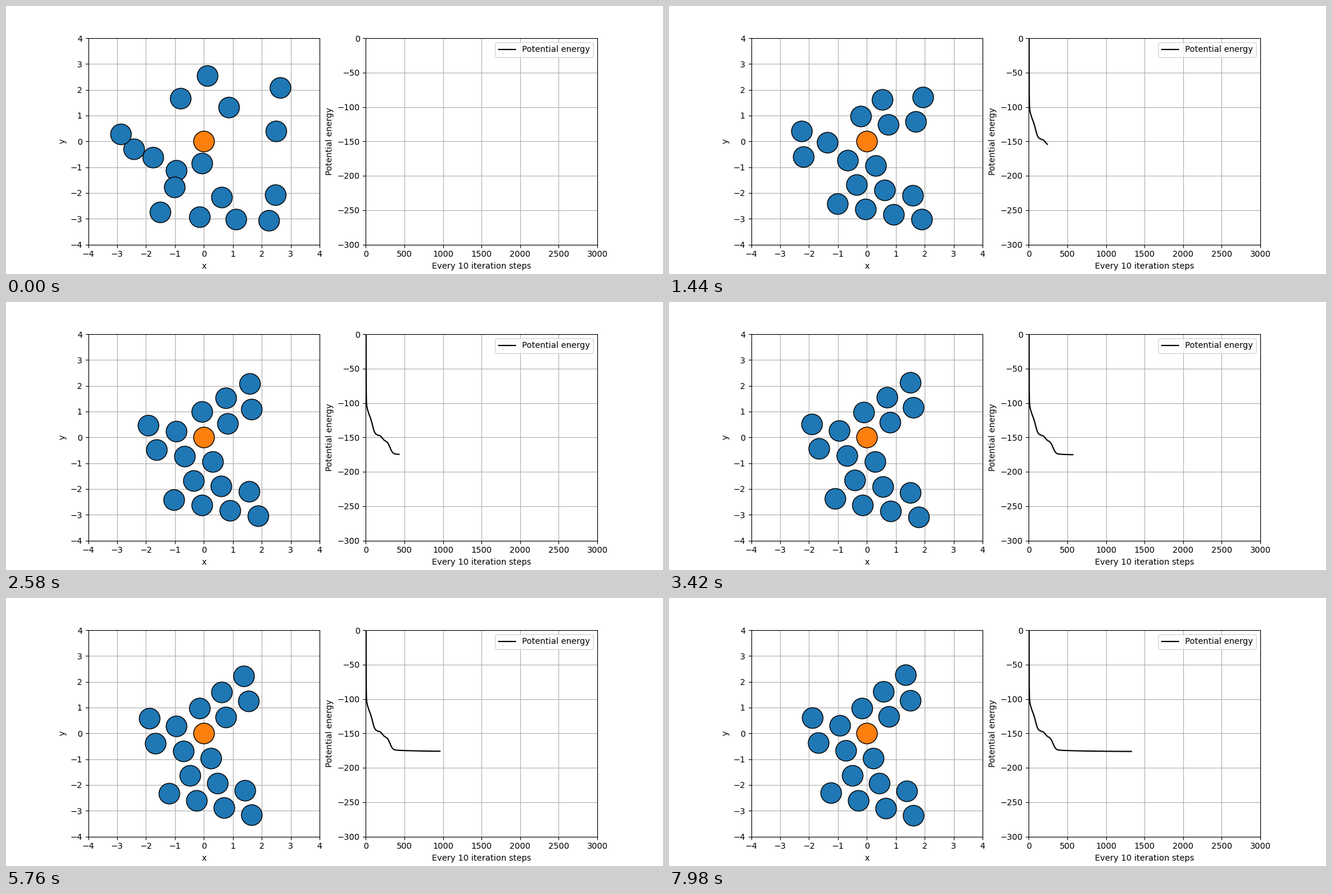
A matplotlib script that plays this animation: 1100 by 450 pixels, repeating every 8000 ms.

```python
import numpy as np
import matplotlib.pyplot as plt
from matplotlib.animation import FuncAnimation

STEPS = 134                 # simulation snapshots, 60 ms each
FRAMES, INTERVAL = 200, 40
SPACING = 0.99              # equilibrium distance
CONTACT = 0.95              # closest distance after the first snapshot
FORMED, FOLDING, DOCKED = 12, 24, 43
HEX = np.exp(1j * np.pi / 3)

# Each arm is a piece of triangular lattice that turns about the fixed ball:
# lattice sites, start positions, angles when formed, folding, docked and
# settled, and the distance still to go when formed and folding.
ARMS = [
    ([HEX, 1 + HEX, 1],
     [-0.81 + 1.67j, 0.12 + 2.54j, 0.86 + 1.32j],
     (52, 41.8, 33.4, 40.4), (0, 0)),
    ([2, 2 + HEX],
     [2.49 + 0.40j, 2.64 + 2.08j],
     (16.8, 15.7, 33.4, 40.4), (0.19 + 0.21j, -0.22 + 0.23j)),
    ([-1 - HEX, -1, -2],
     [-2.42 - 0.30j, -1.76 - 0.62j, -2.87 + 0.28j],
     (-40.4, -26.3, -13.7, -17.9), (-0.89 - 0.91j, -0.49 - 0.49j)),
    ([first + i - row * HEX
      for row, first in ((1, 0), (2, 1), (3, 1)) for i in range(row + 1)],
     [-0.95 - 1.13j, -0.06 - 0.85j,
      -1.02 - 1.77j, 0.62 - 2.16j, 2.47 - 2.07j,
      -1.51 - 2.74j, -0.15 - 2.93j, 1.11 - 3.02j, 2.25 - 3.07j],
     (-12.4, -11.9, -12.3, -17.3), (0, 0)),
]


def separate(z):
    """Push overlapping particles apart; the first one stays fixed."""
    for _ in range(40):
        gap = z[:, None] - z
        dist = np.abs(gap) + np.eye(len(z))
        z = z + (np.clip(CONTACT - dist, 0, None) / 2 * gap / dist).sum(axis=1)
        z[0] = 0
    return z


def build_tracks():
    k = np.arange(STEPS)
    keys = [FORMED, FOLDING, DOCKED]
    pull = 1 - (1 - np.minimum(k / FORMED, 1)) ** 1.6
    settle = 1 - np.exp(-np.maximum(k - DOCKED, 0) / 40)
    settle /= settle[-1]

    parts = [np.zeros((STEPS, 1), complex)]
    for sites, start, (*angles, final), gaps in ARMS:
        angle = np.interp(k, keys, angles) + (final - angles[-1]) * settle
        gap = np.interp(k, keys, np.array([*gaps, 0], complex))
        turn = SPACING * np.exp(1j * np.radians(angle))
        pose = gap[:, None] + turn[:, None] * np.array(sites)
        parts.append(start + (pose - start) * pull[:, None])

    tracks = np.hstack(parts)
    for j in range(1, STEPS):
        tracks[j] = separate(tracks[j])
    return tracks[:, 1:]


def drop(x, depth, middle, width):
    return -depth / (1 + np.exp((middle - x) / width))


def potential(x):
    """Steep repulsion, then one drop for each rearrangement."""
    late = np.maximum(x - 400, 0)
    return (-95 + 400 * np.exp(-x / 1.6)
            - 26 * (1 - np.exp(-x / 28))
            + drop(x, 26, 87, 16)
            + drop(x, 8, 213, 14)
            + drop(x, 19.6, 313, 18)
            - 1.9 * (1 - np.exp(-late / 400)))


tracks = build_tracks()
iteration = np.arange(10 * STEPS)
energy = potential(iteration)

fig, (box, plot) = plt.subplots(1, 2, figsize=(11, 4.5), dpi=100)

ball = dict(marker="o", ls="", ms=25, mec="black", mew=1)
particles, = box.plot([], [], color="tab:blue", **ball)
box.plot([0], [0], color="tab:orange", **ball)
box.set(xlim=(-4, 4), ylim=(-4, 4), xlabel="x", ylabel="y",
        xticks=range(-4, 5), yticks=range(-4, 5))
box.grid()

curve, = plot.plot([], [], color="black", label="Potential energy")
plot.set(xlim=(0, 3000), ylim=(-300, 0),
         xlabel="Every 10 iteration steps", ylabel="Potential energy",
         xticks=range(0, 3001, 500), yticks=range(-300, 1, 50))
plot.grid()
plot.legend(loc="upper right")


def update(i):
    k = (2 * i + 1) // 3    # snapshot shown at the middle of this frame
    particles.set_data(tracks[k].real, tracks[k].imag)
    n = 10 * k + 1
    curve.set_data(iteration[:n], energy[:n])
    return particles, curve


anim = FuncAnimation(fig, update, frames=FRAMES, interval=INTERVAL,
                     repeat=True, repeat_delay=0)
plt.show()
```
